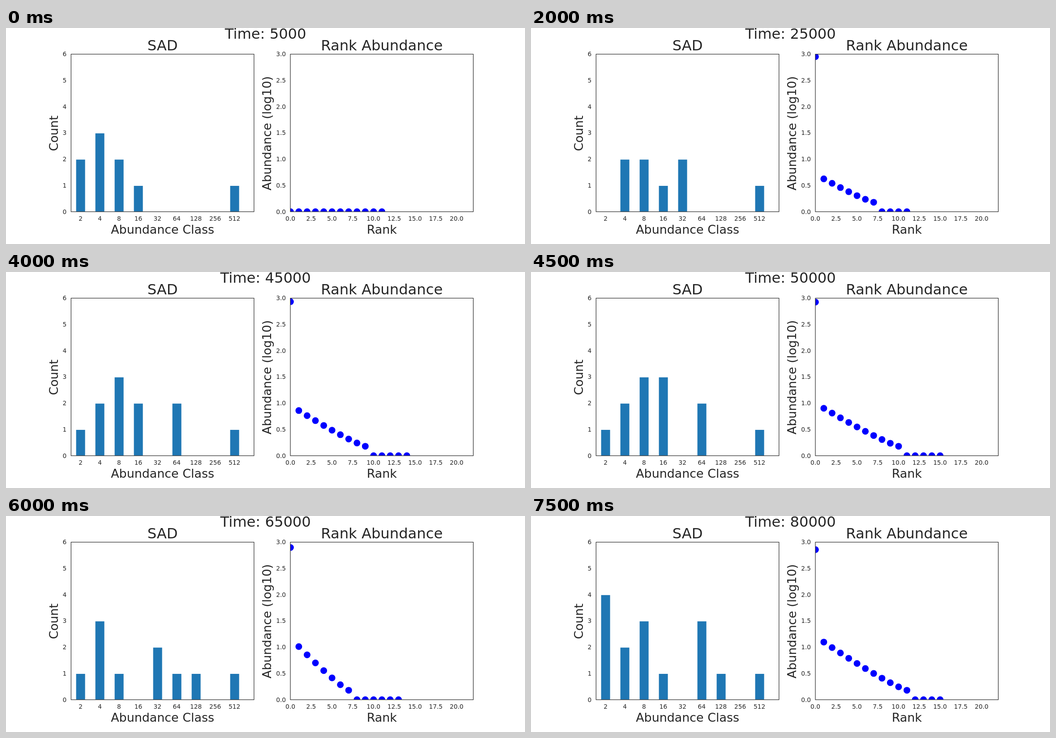
Write an HTML page with a canvas that moves like this. It is 1159 px wide and 483 px high and loops after 8000 ms.

```html
<!DOCTYPE html>
<html lang="en">
<head>
<meta charset="utf-8">
<title>Species abundance over time</title>
<style>
  html, body { margin: 0; width: 100%; height: 100%; overflow: hidden; background: #fff; }
  canvas { display: block; }
</style>
</head>
<body>
<canvas id="stage" width="1159" height="483"></canvas>
<script>
const ctx = document.getElementById('stage').getContext('2d');
const STEP_MS = 500, STEPS = 16, CLASSES = 9, INK = '#262626';
const TOP = 58.5, BOTTOM = 410.8, HEIGHT = BOTTOM - TOP, WIDTH = 408.5;
const LEFT_X = 145.3, RIGHT_X = 635;

// Key states of the community; the steps between them are blended.
// counts: species per abundance class; ranks: plotted dots; present: dots above zero.
const keys = [
  { step: 0, counts: '2321', ranks: 12, present: 0 },
  { step: 2, counts: '2331', ranks: 13, present: 8 },
  { step: 4, counts: '02212', ranks: 12, present: 8 },
  { step: 6, counts: '034001', ranks: 12, present: 7 },
  { step: 9, counts: '123302', ranks: 16, present: 11 },
  { step: 12, counts: '1310211', ranks: 14, present: 8 },
  { step: 15, counts: '4231031', ranks: 16, present: 12 },
];

function community(step) {
  const next = keys.find(k => k.step >= step);
  const prev = keys.findLast(k => k.step <= step);
  const mix = (step - prev.step) / (next.step - prev.step || 1);
  const blend = (a, b) => Math.round(a + (b - a) * mix);
  const counts = Array.from({ length: CLASSES }, (_, i) =>
    blend(+(prev.counts[i] || 0), +(next.counts[i] || 0)));
  counts[CLASSES - 1] = 1; // the dominant species
  return {
    counts,
    ranks: blend(prev.ranks, next.ranks),
    present: blend(prev.present, next.present),
  };
}

// The dominant species slowly shrinks while the runners-up grow linearly.
function logAbundance(step, rank, present) {
  if (rank >= present) return 0;
  if (rank === 0) return Math.log10(912 - .85 * step * step);
  const second = Math.log10(1.2 + .755 * step), last = .18;
  const along = (rank - 1) / (present - 2);
  return last + (second - last) * (1 - along) ** 1.15;
}

function text(str, x, y, size, align = 'center', angle = 0) {
  ctx.save();
  ctx.translate(x, y);
  ctx.rotate(angle);
  ctx.font = `${size}px "DejaVu Sans", sans-serif`;
  ctx.textAlign = align;
  ctx.fillStyle = INK;
  ctx.fillText(str, 0, 0);
  ctx.restore();
}

function axes(x, title, xLabel, yLabel, yLabelX, yTick) {
  ctx.strokeStyle = INK;
  ctx.lineWidth = 1.2;
  ctx.strokeRect(x, TOP, WIDTH, HEIGHT);
  const middle = x + WIDTH / 2;
  text(title, middle, 50, 32.2);
  text(xLabel, middle, 460, 26.9);
  text(yLabel, yLabelX, 235.5, 26.8, 'center', -Math.PI / 2);
  for (let i = 0; i <= 6; i++)
    text(yTick(i), x - 10, BOTTOM + 4.8 - i * HEIGHT / 6, 13.7, 'right');
}

function drawBars(counts) {
  ctx.fillStyle = '#1f77b4';
  counts.forEach((count, i) => {
    if (!count) return;
    const y = BOTTOM + .9 - count * HEIGHT / 6;
    ctx.fillRect(156.6 + 43 * i, y, 20, BOTTOM - y);
  });
}

function drawDots(step, { ranks, present }) {
  ctx.save();
  ctx.beginPath();
  ctx.rect(RIGHT_X, TOP, WIDTH, HEIGHT);
  ctx.clip();
  ctx.fillStyle = '#00f';
  for (let rank = 0; rank < ranks; rank++) {
    const y = BOTTOM - logAbundance(step, rank, present) * HEIGHT / 3;
    ctx.beginPath();
    ctx.arc(RIGHT_X + .3 + rank * 18.56, y, 7.5, 0, 2 * Math.PI);
    ctx.fill();
  }
  ctx.restore();
}

function draw(step) {
  const state = community(step);
  ctx.fillStyle = '#fff';
  ctx.fillRect(0, 0, 1159, 483);
  drawBars(state.counts);
  drawDots(step, state);
  axes(LEFT_X, 'SAD', 'Abundance Class', 'Count', 116, i => i);
  axes(RIGHT_X, 'Rank Abundance', 'Rank', 'Abundance (log10)', 592, i => (i / 2).toFixed(1));
  for (let i = 0; i < CLASSES; i++) {
    text(2 ** (i + 1), 166.6 + 42.93 * i, 431, 13.7);
    text((i * 2.5).toFixed(1), RIGHT_X + i * 46.4, 431, 13.7);
  }
  text('Time: ' + (step + 1) * 5000, 579.7, 24, 32.2);
}

const start = performance.now();
let shown = -1;
function tick() {
  const step = Math.floor((performance.now() - start) / STEP_MS) % STEPS;
  if (step !== shown) draw(shown = step);
  requestAnimationFrame(tick);
}
tick();
</script>
</body>
</html>
```
